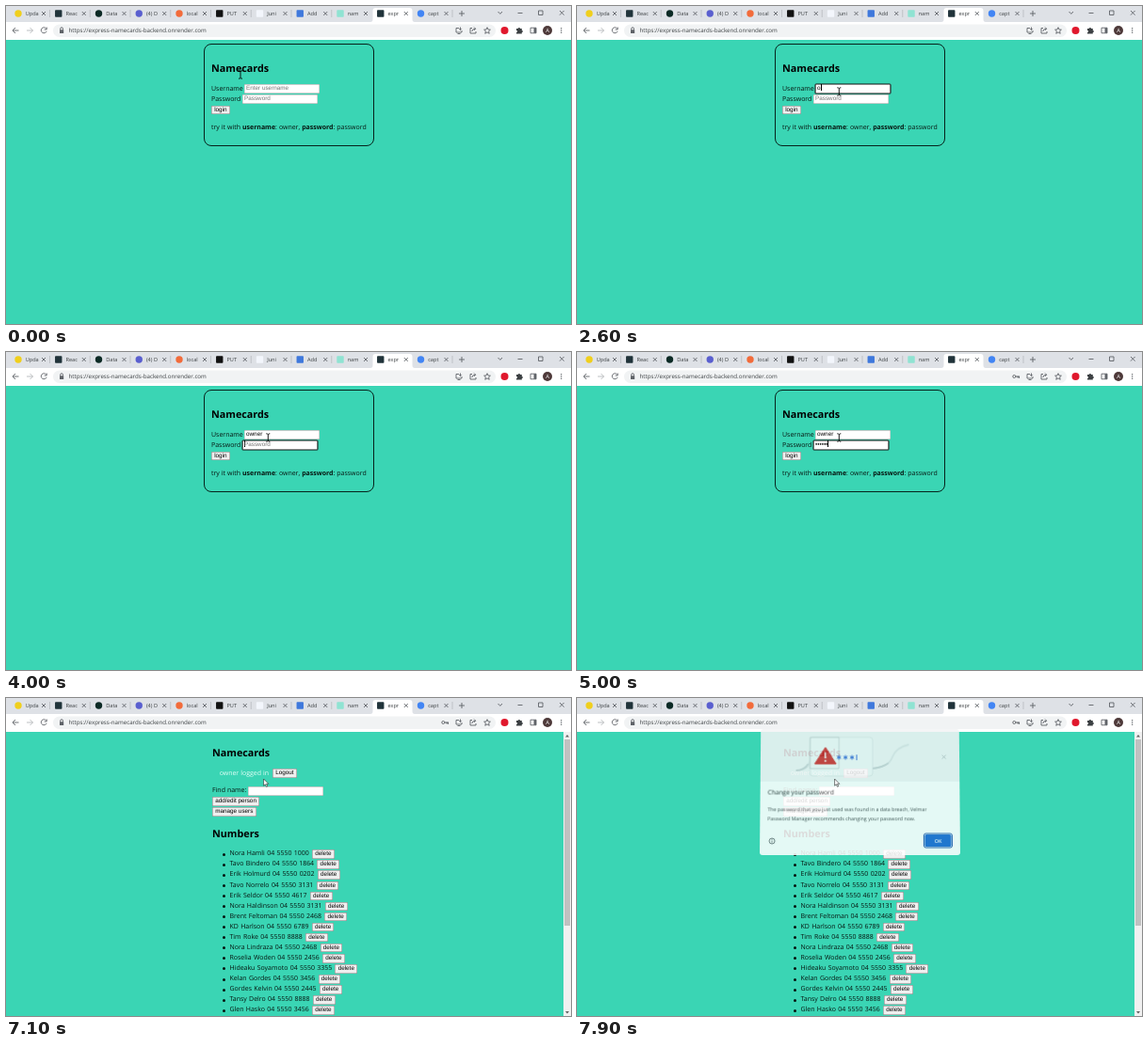
Write an HTML page that moves like this. It is 600 by 338 pixels and loops after 8000 ms.

```html
<!DOCTYPE html>
<html lang="en">
<head>
<meta charset="utf-8">
<title>Namecards</title>
<style>
html, body { margin: 0; width: 100%; height: 100%; overflow: hidden; }
#stage {
  position: relative; width: 600px; height: 338px; overflow: hidden; background: #3ad5b4; color: #06140f;
  font: 6.97px/10px "Open Sans", "Noto Sans", sans-serif; word-spacing: .2px; text-rendering: geometricPrecision;
}
#stage svg, .at { position: absolute; }
.at { white-space: pre; }
svg { left: 0; top: 0; }
svg text { font-family: "Open Sans", "Noto Sans", sans-serif; word-spacing: 0; }
.line { fill: none; stroke: #5f6368; stroke-width: .9; }
h2 { margin: 0; font-size: 10.8px; line-height: 10px; color: #000; }
.card { left: 209.5px; top: 40px; width: 179px; height: 107px; border: 1px solid #06231c; border-radius: 8px; }
.field, .btn { font: 6.35px/10px "Liberation Sans", Arial, sans-serif; color: #000; word-spacing: 0; }
.field { box-sizing: border-box; width: 80px; height: 10px; padding-left: 2px; background: #fff; box-shadow: inset 0 0 0 .4px #8c9a96; }
.field.focus { border-radius: 1px; box-shadow: 0 0 0 .5px #101010, inset 0 0 0 .6px #101010; }
.field em { font-style: normal; color: #757575; }
.caret { display: inline-block; width: .7px; height: 7px; margin-right: -.7px; background: #000; vertical-align: -1.2px; }
.btn {
  display: inline-block; height: 9.5px; padding: 0 3.2px; line-height: 9.5px; background: #efefef; border-radius: 1.3px;
  box-shadow: inset 0 0 0 .5px #767676;
}
.btn.focus { box-shadow: inset 0 0 0 .9px #101010, 0 0 0 .7px #fff; }
.row { word-spacing: .5px; }
.row .btn { margin-left: 1px; }
.row::before { content: ""; position: absolute; left: -7.7px; top: 3.4px; width: 3px; height: 3px; border-radius: 50%; background: #06140f; }
#dialog {
  left: 194px; top: 31px; width: 213px; height: 136px; border-radius: 3px; overflow: hidden; background: #fff;
  transform: perspective(800px) rotateX(4deg); transform-origin: 50% 100%; color: #202124; word-spacing: 0;
}
#dialog .small { font-size: 5.35px; color: #3c4043; }
</style>
</head>
<body>
<div id="stage">
  <div id="login">
    <div class="at card"></div>
    <h2 class="at" style="left:218px;top:62px">Namecards</h2>
    <div class="at" style="left:218px;top:84px">Username</div>
    <div class="at" style="left:218px;top:95px">Password</div>
    <div class="at field" id="user" style="left:253px;top:83px"></div>
    <div class="at field" id="pass" style="left:251px;top:94px"></div>
    <div class="at btn" id="submit" style="left:218px;top:105.8px">login</div>
    <div class="at" style="left:218px;top:124.600px">try it with <b>username</b>: owner, <b>password</b>: password</div>
  </div>

  <div id="home">
    <h2 class="at" style="left:219px;top:54px">Namecards</h2>
    <div class="at" style="left:226.7px;top:75.500px;color:#e6fff8">owner logged in</div>
    <div class="at btn" style="left:283px;top:75.2px">Logout</div>
    <div class="at" style="left:219px;top:94.200px">Find name:</div>
    <div class="at field" style="left:257px;top:94px"></div>
    <div class="at btn" style="left:219px;top:105.3px">add/edit person</div>
    <div class="at btn" style="left:219px;top:116.3px">manage users</div>
    <h2 class="at" style="left:219px;top:140px">Numbers</h2>
    <svg width="600" height="338">
      <path d="M592 36h8v302h-8z" fill="#f1f1f1"/>
      <path d="M593 44h6v198h-6z" fill="#c1c1c1"/>
      <path d="M594 41.5l2-2.5 2 2.5zM594 333l2 2.5 2-2.5z" fill="#606060"/>
    </svg>
  </div>

  <svg id="chrome" width="600" height="36">
    <path d="M0 0h600v17H0z" fill="#dee1e6"/>
    <path d="M0 17h600v19H0z" fill="#fff"/>
    <path d="M387 17q2.5 0 2.5-3V5q0-3 3-3h36q3 0 3 3v9q0 3 2.5 3z" fill="#fff"/>
    <rect x="50" y="19.5" width="470" height="13.5" rx="6.75" fill="#f1f3f4"/>
    <g id="tabs" font-size="5.6" fill="#3c4043"></g>
    <g class="line">
      <path d="M481 8h6m-3-3v6M522.5 6l2.3 2.4L527 6M543.500 7.500h5M565.500 5h4.500v4.500h-4.500zM588 5l4.600 4.600m0-4.600L588 9.600"/>
      <path d="M13.500 26H7m3-3-3 3 3 3M42.700 24a3 3 0 1 0 .4 2.800M43.200 22.500V25h-2.500"/>
      <path d="M22 26h6.500m-3-3 3 3-3 3" stroke="#b4b7ba"/>
      <path d="M57.700 25.500v-1.300a1.400 1.400 0 0 1 2.800 0v1.300"/>
      <path d="M481 23.500h-3v4.500h6v-2M479.500 29.500h3M482.500 22.500v3m-1.300-1.200 1.300 1.300 1.300-1.300"/>
      <path d="M495 23.500h-2v5.500h6v-2M494.800 27q.3-2.800 3.700-2.800M497 22.500l1.700 1.700-1.700 1.700"/>
      <path d="M511 22.700l1 2.300 2.400.2-1.800 1.600.6 2.500-2.200-1.400-2.200 1.400.6-2.500-1.800-1.600 2.400-.2z"/>
      <path d="M557 23.200h6v5.600h-6z"/>
    </g>
    <g fill="#5f6368">
      <path d="M57 25.300h4.200v3.700H57zM560.500 23.200h2.500v5.600h-2.500z"/>
      <path d="M542 24h1.800a1.100 1.100 0 0 1 2.200 0h1.800v1.900a1.100 1.100 0 0 1 0 2.200v1.400H542v-1.600a1 1 0 0 0 0-2z" fill="#3c4043"/>
      <circle cx="589.700" cy="23.700" r=".7"/><circle cx="589.700" cy="26" r=".7"/><circle cx="589.700" cy="28.300" r=".7"/>
    </g>
    <g id="key" class="line"><circle cx="464.300" cy="26" r="1.500"/><path d="M465.800 26h3.700v1.700m-1.500-1.700v1.400" stroke-width="1.100"/></g>
    <circle cx="529.500" cy="26" r="4" fill="#e0182d"/>
    <circle cx="575" cy="26" r="5" fill="#4e3a3a"/>
    <text x="575" y="28.100" font-size="5.800" fill="#fff" text-anchor="middle">A</text>
    <text x="66.500" y="28.300" font-size="6.200" fill="#3c4043">https://express-namecards-backend.onrender.com</text>
  </svg>

  <div id="dialog" class="at">
    <svg width="213" height="136">
      <path d="M0 0h213v57H0z" fill="#f2f4f5"/>
      <g fill="none" stroke="#ccd3d6" stroke-width="1.800">
        <path d="M38 45q16 0 15-15t14-20" stroke="#dfe4e6"/>
        <path d="M119 43q18-1 22-12t18-14" stroke="#dfe4e6"/>
        <path d="M38 45q9 0 13-7M119 43q12-1 18-6"/>
      </g>
      <rect x="53" y="9" width="67" height="42" rx="3" fill="#f5f7f8" stroke="#dde2e4" stroke-width=".8"/>
      <path d="M53 9h31v34H53z" fill="none" stroke="#c5cccf" stroke-width=".8"/>
      <path d="M69.500 20 81 38H58z" fill="#d32f2f" stroke="#d32f2f" stroke-linejoin="round"/>
      <path d="M69.500 25.500V32m0 1.800v2" stroke="#fff" stroke-width="1.700"/>
      <g stroke="#3367d6" stroke-width="1">
        <path id="star" d="M84 28.500v5m-2.200-3.800 4.400 2.500m0-2.500-4.400 2.500"/>
        <use href="#star" x="7"/><use href="#star" x="14"/><path d="M103 28v6"/>
      </g>
      <path d="M194.500 28.500l4 4m0-4-4 4" stroke="#aeb4b8" stroke-width=".8"/>
      <circle cx="13" cy="121" r="3" class="line" stroke-width=".7"/>
      <path d="M13 120.500v2.200m0-3.900v.9" class="line"/>
      <rect x="174.500" y="113" width="30" height="15" rx="2" fill="#fff" stroke="#174ea6"/>
      <rect x="175.500" y="114" width="28" height="13" rx="1.500" fill="#1a67d2"/>
      <text x="189.500" y="122.600" font-size="5.400" font-weight="600" fill="#fff" text-anchor="middle">OK</text>
    </svg>
    <div class="at" style="left:8px;top:63.700px;font-size:6.640px">Change your password</div>
    <div class="at small" style="left:8px;top:82px">The password that you just used was found in a data breach, Velmar
Password Manager recommends changing your password now.</div>
  </div>

  <svg width="600" height="338">
    <path id="beam" d="M-2-4.200q1.500 0 2 .8.500-.8 2-.8M0-3.400v6.800M-2 4.200q1.500 0 2-.8.500.8 2 .8" fill="none" stroke="#000" stroke-width=".9"/>
    <path id="arrow" d="M273.600 86v7.200l1.700-1.500 1.200 2.600 1.200-.5-1.200-2.500h2.300z" fill="#fff" stroke="#222" stroke-width=".6"/>
  </svg>
</div>

<script>
const LOOP = 8000, FOCUS = 300, NEXT = 4000, SUBMIT = 6000, HOME = 7100;
const USER = "owner";
const userKeys = [2600, 2800, 2900, 3100, 3400];
const passKeys = [4100, 4200, 4400, 4500, 4800, 5000, 5300, 5500];
const $ = id => document.getElementById(id);
const show = (id, on) => $(id).style.display = on ? "" : "none";

// label, icon colour, round icon
const tabs = [
  ["Upda", "#f0cf1c", 1], ["Reac", "#20333a", 0], ["Data", "#0b2a25", 1], ["(4) D", "#5a5fcf", 1],
  ["local", "#f26b3a", 1], ["PUT", "#111", 0], ["Juni", "#f3f6fc", 0], ["Add", "#3f78dc", 0],
  ["nam", "#8fe3d2", 0], ["expr", "#20333a", 0], ["capt", "#4285f4", 1]
];
$("tabs").innerHTML = tabs.map(([label, color, round], i) => {
  const x = 13 + 42.75 * i;
  const edge = i == 8 || i == 9 ? "" : `<path d="M${x + 33.5} 4v8" stroke="#a9adb2" stroke-width=".6"/>`;
  return `<rect x="${x - 3.7}" y="4.300" width="7.400" height="7.400" rx="${round ? 3.7 : .8}" fill="${color}"/>
    <text x="${x + 7.7}" y="10.200">${label}</text>
    <path class="line" d="M${x + 25} 6l4 4m0-4-4 4"/>${edge}`;
}).join("");

const people = [
  "Nora Hamli 04 5550 1000", "Tavo Bindero 04 5550 1864", "Erik Holmurd 04 5550 0202", "Tavo Norrelo 04 5550 3131",
  "Erik Seldor 04 5550 4617", "Nora Haldinson 04 5550 3131", "Brent Feltoman 04 5550 2468", "KD Harlson 04 5550 6789",
  "Tim Roke 04 5550 8888", "Nora Lindraza 04 5550 2468", "Roselia Woden 04 5550 2456", "Hideaku Soyamoto 04 5550 3355",
  "Kelan Gordes 04 5550 3456", "Gordes Kelvin 04 5550 2445", "Tansy Delro 04 5550 8888", "Glen Hasko 04 5550 3456"
];
$("home").insertAdjacentHTML("afterbegin", people.map((person, i) =>
  `<div class="at row" style="left:237.500px;top:${161.3 + 11.07 * i}px">${person} <span class="btn">delete</span></div>`
).join(""));

const pressed = (keys, t) => keys.filter(k => k <= t);

function field(id, value, hint, from, to, keys, t) {
  const focused = t >= from && t < to;
  const last = [from, ...pressed(keys, t)].pop();
  const caret = focused && (t - last) % 1000 < 500 ? '<span class="caret"></span>' : "";
  $(id).classList.toggle("focus", focused);
  $(id).innerHTML = value ? value + caret : `${caret}<em>${hint}</em>`;
}

function frame() {
  const t = performance.now() % LOOP;
  const home = t >= HOME;
  show("login", !home);
  show("home", home);
  show("beam", !home);
  show("arrow", home);
  show("key", t >= passKeys[0]);

  field("user", USER.slice(0, pressed(userKeys, t).length), "Enter username", FOCUS, NEXT, userKeys, t);
  field("pass", "•".repeat(pressed(passKeys, t).length), "Password", NEXT, SUBMIT, passKeys, t);
  $("submit").classList.toggle("focus", t >= SUBMIT);

  const move = t < 200 ? 0 : t < FOCUS ? .6 : 1;
  $("beam").setAttribute("transform", `translate(${249 + 29.3 * move} ${73 + 18 * move})`);

  const fade = Math.max(0, Math.floor((t - 7700) / 100));
  show("dialog", fade);
  $("dialog").style.opacity = .43 * fade;
  requestAnimationFrame(frame);
}
frame();
</script>
</body>
</html>
```
